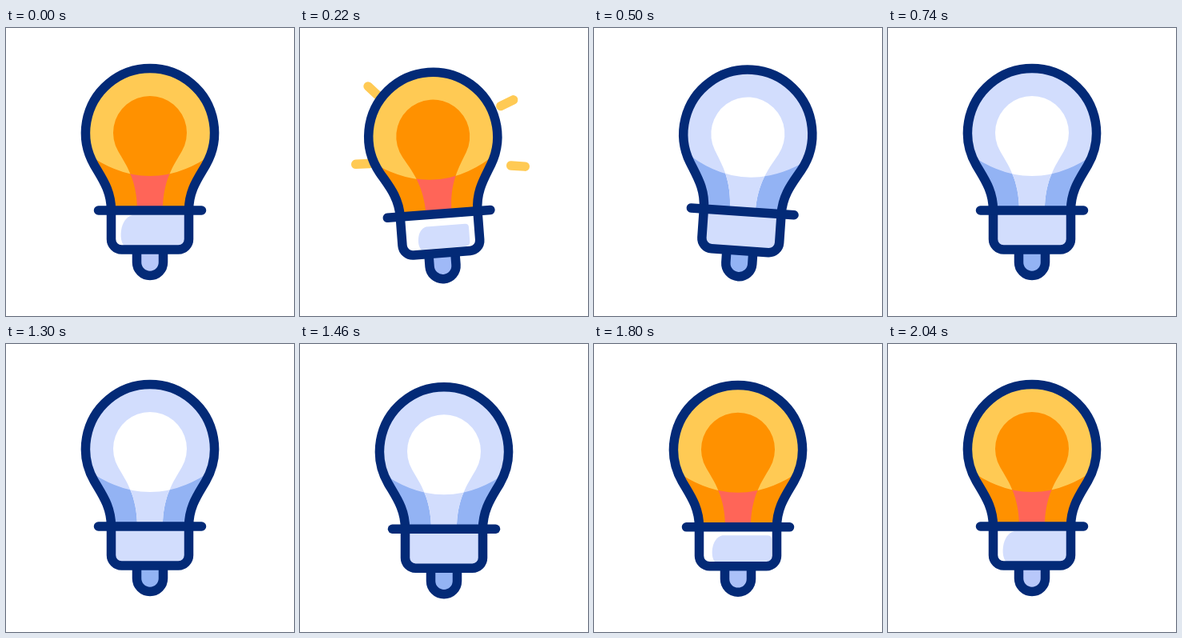
Recreate the animation shown at these times as an HTML page. Size 360 by 360 pixels, loop 2400 ms.

```html
<!DOCTYPE html>
<html lang="en">
<head>
<meta charset="utf-8">
<title>Light bulb</title>
<style>
html, body { margin: 0; height: 100%; overflow: hidden; background: #fff; }
svg { display: block; width: 100vw; height: 100vh; }
</style>
</head>
<body>
<svg viewBox="0 0 360 360" fill="none" stroke-linecap="round" stroke-linejoin="round">
  <defs>
    <path id="glass" d="M131.5 228C131.5 203 120 188 110.3 171.3A80.5 80.5 0 1 1 249.7 171.3C240 188 228.5 203 228.5 228"/>
    <path id="core" d="M164 228C164 190 150 171 140.2 154A46 46 0 1 1 219.8 154C210 171 196 190 196 228Z"/>
    <path id="base" d="M131.5 228V264a13 13 0 0 0 13 13H215.5a13 13 0 0 0 13 -13V228"/>
    <path id="knob" d="M163.5 280V293a16.5 16.5 0 0 0 33 0V280"/>
    <path id="low" d="M90 153L110 163Q180 207 250 163L270 153V228H90Z"/>
    <clipPath id="inGlass"><use href="#glass"/></clipPath>
    <clipPath id="inCore"><use href="#core"/></clipPath>
  </defs>
  <g id="rays" stroke="#ffca54" stroke-width="11.5"></g>
  <g id="bulb">
    <g>
      <use href="#glass" fill="#d2ddfd"/>
      <use href="#low" fill="#93b3f4" clip-path="url(#inGlass)"/>
      <use href="#core" fill="#fff"/>
      <use href="#low" fill="#d2ddfd" clip-path="url(#inCore)"/>
      <use href="#base" fill="#d2ddfd"/>
      <use href="#knob" fill="#93b3f4"/>
    </g>
    <g id="lit">
      <use href="#glass" fill="#ffca54"/>
      <use href="#low" fill="#ff9100" clip-path="url(#inGlass)"/>
      <use href="#core" fill="#ff9100"/>
      <use href="#low" fill="#ff6558" clip-path="url(#inCore)"/>
      <use href="#base" fill="#fff"/>
      <path id="patch" fill="#d2ddfd" d="M158 234H222q6 0 6 6V264q0 8 -8 8H148C141 268 141 238 158 234Z"/>
      <use id="glow" href="#knob" fill="#b8c8fa"/>
    </g>
    <g stroke="#032a77" stroke-width="11.5">
      <use href="#knob"/>
      <use href="#base"/>
      <use href="#glass"/>
      <path d="M115.5 228H244.5"/>
    </g>
  </g>
</svg>
<script>
const LOOP = 2400;
const $ = id => document.getElementById(id);

// Sine-eased value through [time, value] keys
function keys(t, ...k) {
  if (t <= k[0][0]) return k[0][1];
  for (let i = 1; i < k.length; i++) {
    const [t0, a] = k[i - 1], [t1, b] = k[i];
    if (t < t1) return a + (b - a) * (1 - Math.cos(Math.PI * (t - t0) / (t1 - t0))) / 2;
  }
  return k[k.length - 1][1];
}

// Each ray: anchor x, y and outward direction in degrees
const rays = [[97, 84, 223], [252, 97, -26], [86, 169.5, 177], [265, 172, 4]].map(([x, y, deg]) => {
  const el = document.createElementNS("http://www.w3.org/2000/svg", "path");
  $("rays").append(el);
  const a = deg * Math.PI / 180;
  return { el, at: s => `${x + s * Math.cos(a)} ${y + s * Math.sin(a)}` };
});

const bob = t => keys(t, [0, 0], [240, 4.6], [560, 0.4], [700, 0]);

function draw(t) {
  const dy = bob(t - 30) + bob(t - 1310);
  const turn = keys(t, [40, 0], [200, -4.5], [460, 4.2], [700, 0]);
  $("bulb").setAttribute("transform", `translate(0 ${dy}) rotate(${turn} 180 312)`);
  $("lit").setAttribute("opacity", keys(t, [260, 1], [380, 0], [1640, 0], [1780, 1]));

  // Shrinking highlight and dimming knob
  const dim = keys(t, [60, 0], [220, 1], [1640, 1], [1960, 0]);
  $("patch").setAttribute("transform",
    `translate(178 268) scale(${1 - 0.24 * dim} ${1 - 0.26 * dim}) translate(-178 -268)`);
  $("glow").setAttribute("opacity", 1 - 0.7 * dim);

  const head = keys(t, [80, -20], [290, 28]);
  const tail = keys(t, [124, -20], [350, 28]);
  for (const { el, at } of rays)
    el.setAttribute("d", head - tail > 0.2 ? `M${at(tail)}L${at(head)}` : "");
}

const start = performance.now();
function tick() {
  draw((performance.now() - start) % LOOP);
  requestAnimationFrame(tick);
}
tick();
</script>
</body>
</html>
```
